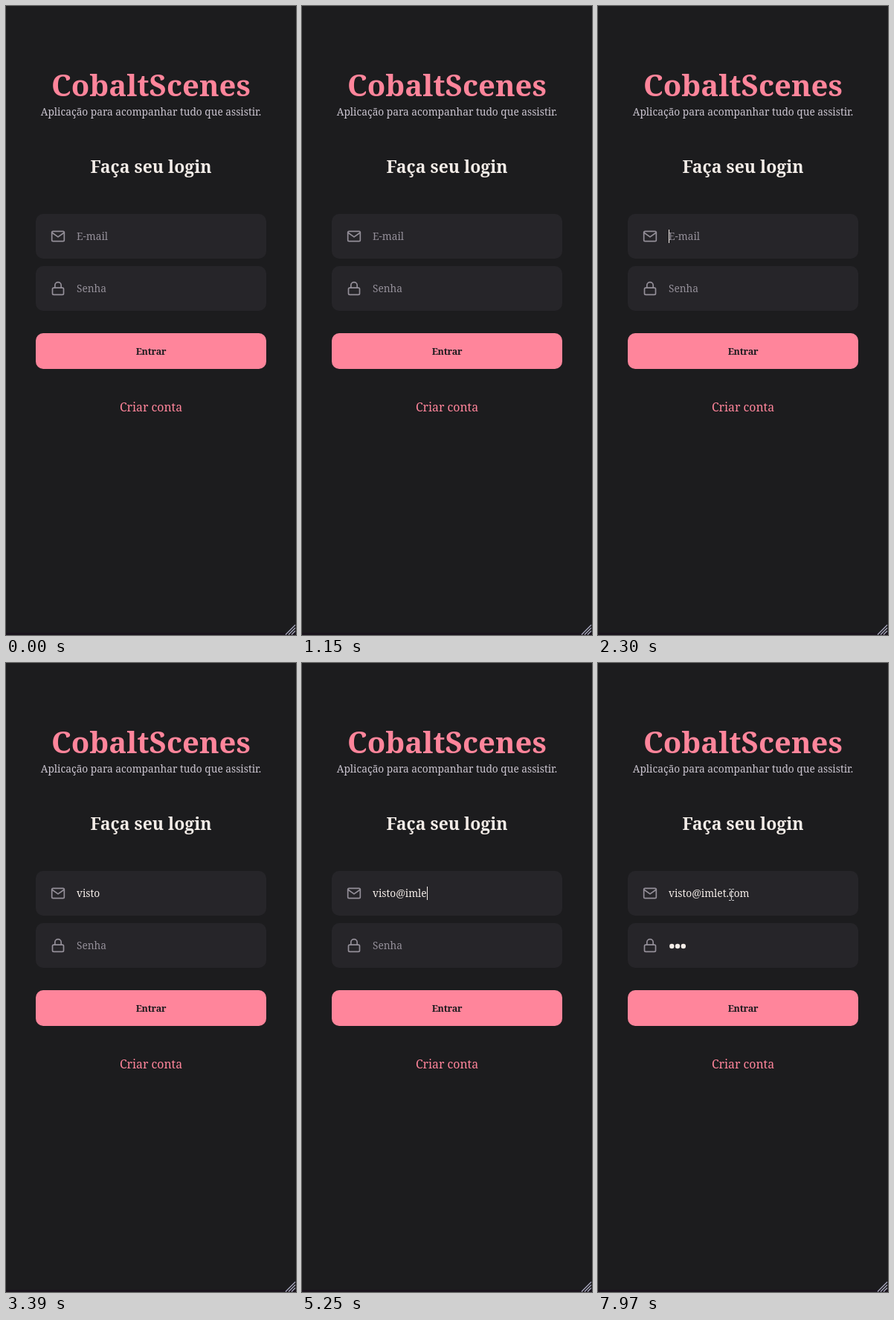
Animation of 390 by 844 pixels, one loop 8 s. Source, as an HTML page:

```html
<!DOCTYPE html>
<html lang="pt-BR">
<head>
<meta charset="utf-8">
<title>Login</title>
<style>
  html, body { margin: 0; width: 100%; height: 100%; overflow: hidden; background: #1c1c1e; }
  svg { display: block; width: 390px; height: 844px; }
  text { font: 500 13.7px "Noto Serif", serif; fill: #f4ede8; }
  .mid { text-anchor: middle; }
  .pink { fill: #ff859b; }
  .title { font-size: 40px; font-weight: 700; }
  .sub { fill: #cac4cf; }
  .heading { font-size: 23px; font-weight: 700; }
  .button { font-size: 12.5px; font-weight: 700; letter-spacing: -.2px; fill: #1c1b1e; }
  .link { font-size: 15.8px; }
  .hint { fill: #948f99; }
  .field { fill: #262529; }
  .icon { fill: none; stroke: #948f99; stroke-width: 2; stroke-linecap: round; stroke-linejoin: round; }
</style>
</head>
<body>
<svg viewBox="0 0 390 844">
  <defs>
    <radialGradient id="shade">
      <stop offset=".55" stop-color="#000" stop-opacity=".28"/>
      <stop offset="1" stop-color="#000" stop-opacity=".05"/>
    </radialGradient>
  </defs>
  <rect width="390" height="844" fill="#1c1c1e"/>
  <rect y="841" width="390" height="3" fill="#1a141d"/>
  <path d="M376 843.5l13-13M380 843.5l9-9M384 843.5l5-5" stroke="#a8a8bc" stroke-width="1.3"/>

  <text class="mid pink title" x="195" y="121">CobaltScenes</text>
  <text class="mid sub" x="195" y="147">Aplicação para acompanhar tudo que assistir.</text>
  <text class="mid heading" x="195" y="224">Faça seu login</text>

  <rect class="field" x="40" y="279" width="310" height="60" rx="10"/>
  <rect class="field" x="40" y="349" width="310" height="60" rx="10"/>
  <g class="icon" transform="translate(60 299) scale(.8333)">
    <rect x="2" y="4" width="20" height="16" rx="2"/>
    <path d="M22 6l-10 7L2 6"/>
  </g>
  <g class="icon" transform="translate(60 369) scale(.8333)">
    <rect x="3" y="11" width="18" height="11" rx="2"/>
    <path d="M7 11V7a5 5 0 0 1 10 0v4"/>
  </g>
  <text class="hint" id="mailHint" x="95" y="314">E-mail</text>
  <text class="hint" id="passHint" x="95" y="384">Senha</text>
  <text id="mail" x="95" y="314"></text>
  <g id="dots" fill="#f4ede8">
    <circle cx="99.3" cy="380" r="3.2"/>
    <circle cx="107" cy="380" r="3.2"/>
    <circle cx="114.8" cy="380" r="3.2"/>
  </g>
  <rect id="caret" width="1" height="18" fill="#f4ede8"/>

  <rect class="pink" x="40" y="439" width="310" height="48" rx="10"/>
  <text class="mid button" x="195" y="468">Entrar</text>
  <text class="mid pink link" x="195" y="544">Criar conta</text>

  <circle id="touch" r="10" fill="url(#shade)"/>
  <path id="beam" d="M176 303.5h2.5l1 1 1-1h2.5M179.5 304.5v13M176 318.5h2.5l1-1 1 1h2.5" fill="none" stroke="#c8c8ca"/>
</svg>
<script>
const LOOP = 8000;
const ADDRESS = 'visto@imlet.com';
const mailKeys = [2370, 2440, 2640, 2840, 2970, 4300, 4710, 4910, 5050, 5250, 5510, 5780, 5910, 6110, 6310];
const passKeys = [7380, 7440, 7570];
const caretOn = [[1280, 1750], [2300, 3390], [3920, 6580], [6780, 7310], [7380, 7900]];
const touchOn = [[200, 1150], [1280, 1490]];
const touchPath = [[200, 358, 829], [480, 358, 720], [950, 154, 342], [1280, 140, 333], [1490, 130, 298]];

const el = id => document.getElementById(id);
const show = (node, on) => node.setAttribute('visibility', on ? 'visible' : 'hidden');
const place = (node, attrs) => Object.entries(attrs).forEach(([k, v]) => node.setAttribute(k, v));
const typed = (keys, t) => keys.filter(k => k <= t).length;
const within = (spans, t) => spans.some(([from, to]) => t >= from && t < to);

function along(path, t) {
  const i = Math.max(1, path.findIndex(p => p[0] > t));
  const [t0, x0, y0] = path[i - 1], [t1, x1, y1] = path[i];
  const k = (t - t0) / (t1 - t0);
  return [x0 + (x1 - x0) * k, y0 + (y1 - y0) * k];
}

function render(t) {
  const chars = typed(mailKeys, t), secret = typed(passKeys, t);
  const mail = el('mail');
  mail.textContent = ADDRESS.slice(0, chars);
  show(el('mailHint'), !chars);
  show(el('passHint'), !secret);
  [...el('dots').children].forEach((dot, i) => show(dot, i < secret));

  const inPass = t >= 6780;
  const width = inPass ? secret * 8 : chars && mail.getComputedTextLength();
  place(el('caret'), { x: Math.round(95 + width), y: inPass ? 370 : 300 });
  show(el('caret'), within(caretOn, t));

  const touching = within(touchOn, t);
  show(el('touch'), touching);
  if (touching) {
    const [cx, cy] = along(touchPath, 200 + Math.floor((t - 200) / 70) * 70);
    place(el('touch'), { cx, cy });
  }
  show(el('beam'), t >= 7970);
}

const start = performance.now();
function tick() {
  render((performance.now() - start) % LOOP);
  requestAnimationFrame(tick);
}
tick();
</script>
</body>
</html>
```
